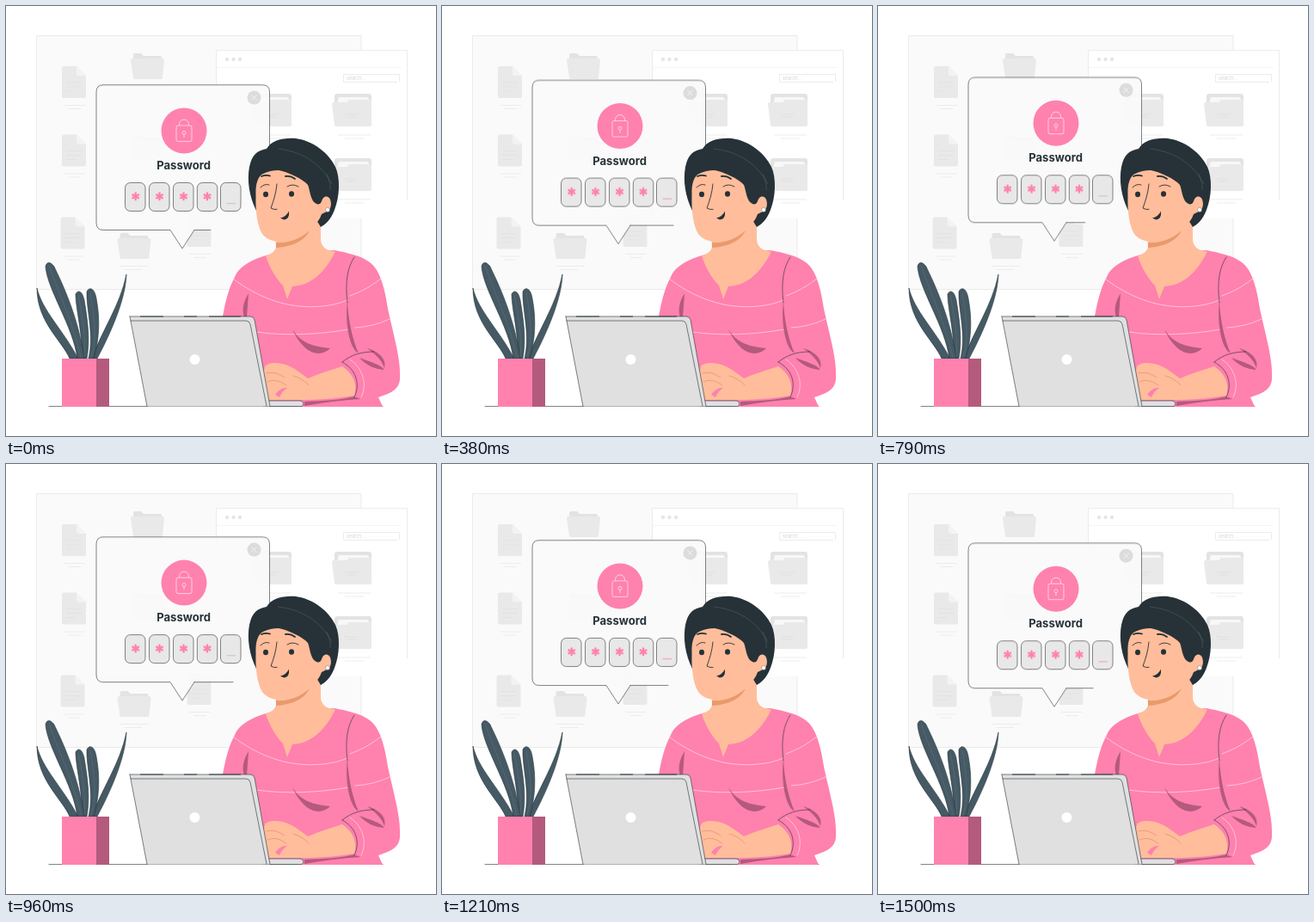
An HTML page for the animation above (1540 ms loop, 500x500 px).

```html
<!DOCTYPE html>
<html lang="en">
<head>
<meta charset="utf-8">
<title>Password entry</title>
<style>
html, body { margin: 0; width: 100%; height: 100%; overflow: hidden; background: #fff; }
svg { display: block; width: 100vw; height: 100vh; }
text { font-family: Inter, "Open Sans", sans-serif; }

.line { fill: none; stroke: #263238; stroke-width: .6; stroke-linecap: round; stroke-linejoin: round; }
.seam { fill: none; stroke: #ffd3e2; stroke-width: .8; stroke-linecap: round; }
.pink { fill: #ff81ae; }
.plum { fill: #b45a7c; }
.skin { fill: #ffbd9b; }
.dark { fill: #263238; }
.faint { fill: none; stroke: #ececec; stroke-width: 1; }

#bubble { animation: float 1540ms linear infinite; }
#edge { transform-origin: 219px 0; animation: edge 1540ms step-end infinite; }
#cursor { animation: blink 1540ms step-end infinite; }

@keyframes float {
  0% { transform: translateY(0); }
  13.6% { transform: translateY(-2.9px); }
  24.7% { transform: translateY(-5.4px); }
  40.9% { transform: translateY(-8.4px); }
  47% { transform: translateY(-9px); }
  53% { transform: translateY(-8.6px); }
  62.3% { transform: translateY(-6.9px); }
  78.6% { transform: translateY(-3.1px); }
  91% { transform: translateY(-.6px); }
  97.4%, 100% { transform: translateY(.2px); }
}
@keyframes edge {
  0% { transform: scaleX(.35); }
  8% { transform: scaleX(1); }
  20% { transform: scaleX(.91); }
  35% { transform: scaleX(.4); }
  52% { transform: scaleX(.82); }
  72% { transform: scaleX(.8); }
  90% { transform: scaleX(.57); }
  99% { transform: scaleX(.35); }
}
@keyframes blink {
  0% { stroke: #b9b9b9; }
  8% { stroke: #ff81ae; }
  34% { stroke: #b9b9b9; }
  71% { stroke: #ff81ae; }
  99.5% { stroke: #b9b9b9; }
}
</style>
</head>
<body>
<svg viewBox="0 0 500 500">
  <defs>
    <g id="doc">
      <path fill="#e9e9e9" d="M2 0H17L28 11V35Q28 37 26 37H2Q0 37 0 35V2Q0 0 2 0Z"/>
      <path fill="#f3f3f3" d="M17 0V9Q17 11 19 11H28Z"/>
      <path fill="none" stroke="#e1e1e1" stroke-width=".8" d="M5 19H23M5 24H23M5 29H17"/>
      <path class="faint" d="M3 45.5H27M8 49.5H22"/>
    </g>
    <g id="folder">
      <path fill="#e3e3e3" d="M3 29V2Q3 0 5 0H12L15 3H34Q36 3 36 5V29Z"/>
      <path fill="#e9e9e9" d="M0 8Q0 6 2 6H37Q39 6 39 8L37 28Q37 30 35 30H5Q3 30 3 28Z"/>
    </g>
    <g id="files">
      <path fill="#e3e3e3" d="M3 37V3Q3 0 6 0H43Q46 0 46 3V37Z"/>
      <path fill="#f8f8f8" d="M6 11L8 4H41L43 6V11Z"/>
      <path fill="#e9e9e9" d="M0 12Q0 10 2 10H17L20 7H44Q46 7 46 9V36Q46 38 44 38H5Q3 38 3 36Z"/>
      <path fill="none" stroke="#dedede" stroke-width=".8" d="M14 24H31M17 27H28"/>
      <path class="faint" d="M7 48H45M15 52H37"/>
    </g>
    <path id="star" fill="none" stroke="#ff81ae" stroke-width="2.3" d="M0-4.9V4.9M-4.2-2.4L4.2 2.4M-4.2 2.4L4.2-2.4"/>
    <rect id="box" width="23.5" height="33" rx="6" fill="#e8e8e8" stroke="#333" stroke-width=".6"/>
  </defs>

  <!-- back window -->
  <path fill="#fafafa" stroke="#ebebeb" d="M35.5 34.5H413V329.5H35.5Z"/>
  <use href="#doc" x="65" y="70"/>
  <use href="#doc" x="65" y="149.5"/>
  <use href="#doc" x="63.5" y="245.5"/>
  <use href="#doc" x="210.5" y="243"/>
  <use href="#folder" x="145" y="55"/>
  <use href="#folder" x="145" y="150"/>
  <use href="#folder" x="129.5" y="264"/>
  <path class="faint" d="M149 93.5H180M132 302.5H166M138 306.5H158"/>

  <!-- front window -->
  <path fill="#fff" d="M244.5 51.5H466.5V247H244.5Z"/>
  <path class="faint" d="M244.5 247V51.5H466.5V226M457.5 88V79.5H392.5V88.5H455"/>
  <path fill="none" stroke="#f5f5f5" d="M245 71.5H460"/>
  <g fill="#e6e6e6"><circle cx="257" cy="62" r="2.2"/><circle cx="264.5" cy="62" r="2.2"/><circle cx="272" cy="62" r="2.2"/></g>
  <text x="396" y="86" font-size="5.5" fill="#d4d4d4">search...</text>
  <use href="#files" x="379" y="102"/>
  <use href="#files" x="379" y="177"/>
  <use href="#files" x="286" y="102"/>
  <use href="#files" x="286" y="177"/>

  <!-- password bubble -->
  <g id="bubble">
    <path fill="#fafafa" fill-opacity=".93" d="M113 91.8H298.5Q306.500 91.8 306.500 100V252Q306.500 260.5 298.5 260.5H219L205 282L191 260.5H113Q105 260.5 105 252V100Q105 91.8 113 91.8Z"/>
    <path class="line" d="M306.5 175V100Q306.5 91.8 298.5 91.8H113Q105 91.8 105 100V252Q105 260.5 113 260.5H191L205 282L219 260.5"/>
    <path id="edge" class="line" d="M219 260.5H274"/>
    <circle cx="288.5" cy="106.5" r="8" fill="#dcdcdc"/>
    <path fill="none" stroke="#f6f6f6" stroke-width=".9" d="M285.5 103.5L291.5 109.5M291.5 103.5L285.5 109.5"/>
    <circle class="pink" cx="207" cy="145" r="26.5"/>
    <g fill="none" stroke="#ffe3ed" stroke-width=".8">
      <rect x="198" y="139" width="18" height="18.5" rx="2"/>
      <path d="M201.5 139V137.5A5.3 5.3 0 0 1 212.5 137.5V139M207 149.5V153"/>
      <circle cx="207" cy="147.5" r="2"/>
    </g>
    <text x="206.6" y="190" text-anchor="middle" font-size="13.1" font-weight="700" fill="#263238">Password</text>
    <use href="#box" x="138.5" y="205.5"/>
    <use href="#box" x="166.5" y="205.5"/>
    <use href="#box" x="194.5" y="205.5"/>
    <use href="#box" x="222.3" y="205.5"/>
    <use href="#box" x="249.5" y="205.5"/>
    <use href="#star" x="150.7" y="221.3"/>
    <use href="#star" x="178.5" y="221.3"/>
    <use href="#star" x="206.5" y="221.3"/>
    <use href="#star" x="234" y="221.3"/>
    <path id="cursor" fill="none" stroke-width=".8" d="M256.5 229.7H267"/>
  </g>

  <!-- table -->
  <path class="line" d="M50 465.5H438"/>

  <!-- plant -->
  <g fill="#455a64" stroke="#263238" stroke-width=".6">
    <path d="M100 410C110 380 133 348 140 312C139 340 124 376 106 410Z"/>
    <path d="M74 410C66 390 36 368 36 328C42 354 66 376 84 410Z"/>
    <path d="M88 410C90 386 81 352 81 335C84 329 89 332 91 342C95 366 98 388 94 410Z"/>
    <path d="M96 410C103 382 93 352 94 332C97 326 103 328 105 340C110 366 108 390 102 410Z"/>
    <path d="M83 410C78 372 48 330 46 303C47 297 52 297 56 303C64 320 84 360 91 410Z"/>
  </g>
  <path fill="none" stroke="#63757e" stroke-width=".5" d="M50 302C62 336 78 368 87 408M84 336C89 360 93 386 91 408M98 333C103 362 106 388 99 408"/>
  <path class="pink" d="M65 410H106V466H65Z"/>
  <path class="plum" d="M105 410H120V466H105Z"/>

  <!-- torso -->
  <path class="pink" d="M309 288C288 294 272 301 266 315C258 330 255 345 251 366L288 372L305 460L341 466H438L433 455C449 450 459 445 458 430C459 410 450 380 444 352C440 325 434 306 423 298C412 290 397 287 382 284Z"/>
  <path class="skin" d="M313 260L314 280Q313 287 302 290.5C306 303 313 316 322 325L327 341L333 326C357 325 373 306 383 285.5Q367 284 366 272V237H325Z"/>
  <path fill="#e99a6b" d="M314 275C328 276 342 271 353 261C347 274 331 280 314 281Z"/>
  <path class="seam" d="M264 317C282 331 304 342 327 347C352 352 379 350 397 342M400 337C414 332 426 325 437 316M406 374Q427 373 446 364M291 379C325 384 365 382 398 376"/>
  <path class="line" d="M405 292C397 304 394 321 397 345"/>
  <path class="plum" d="M397 343C398 366 403 388 410 404C399 398 394 368 397 343ZM333 376C341 389 353 396 377 398C367 408 348 408 333 376ZM282 334C276 344 274 353 277 362H280ZM347 460C370 459 390 458 406 454L412 457Q380 459 347 465Z"/>
  <path class="pink" d="M391 414C402 404 423 396 442 403C458 411 462 438 449 448C437 454 423 457 405 455C412 441 405 425 391 414Z"/>
  <path class="plum" d="M420 398C434 402 443 411 440 421C437 412 430 405 420 398ZM411 409C424 414 436 417 440 423C428 422 419 418 411 409Z"/>
  <path class="line" d="M391 414C406 422 413 438 405 455M391 414C402 405 414 402 428 402"/>
  <path class="seam" d="M400 411C414 420 421 439 413 455"/>

  <!-- head -->
  <path class="dark" d="M291 238C283 222 280 203 283 187C286 173 292 168 303 166C309 156 322 153 337 154C358 157 375 171 383 187C389 200 388 222 382 237C377 250 371 254 366 257L340 215Z"/>
  <path class="skin" d="M290.5 220C290 206 293 198 299 195Q307 191 317 191C328 193 345 201 351 208C354 216 354 227 361 230Q365 232 367 227C369 220 375 220 377 225C379 231 378 238 371 240L367 242C363 254 350 264 341 269C327 277 306 276 298 265C292 255 290 239 290.5 220Z"/>
  <path fill="none" stroke="#55666e" stroke-width=".5" d="M316 166C342 169 365 181 379 207M373 195Q378 207 377 214"/>
  <path fill="none" stroke="#263238" stroke-width="1.8" stroke-linecap="round" d="M297 198Q302 196 307 197.5M325 198Q331 197 336 201"/>
  <path class="line" style="stroke-width:.9" d="M296 211Q301 206 306 208M327 210Q333 206 340 210M315 207C314 218 311 227 308 235Q311 237 315 236.5"/>
  <ellipse class="dark" cx="302" cy="219" rx="3" ry="3.3"/>
  <ellipse class="dark" cx="332" cy="218.5" rx="3" ry="3.3"/>
  <path class="dark" d="M319 246.5Q326 245 329 238.500Q330 248 323 248.500Z"/>
  <circle cx="374" cy="237" r="2.5" fill="#fff" stroke="#263238" stroke-width=".3"/>

  <!-- hand -->
  <path class="skin" d="M391 419C379 423 365 427 351 433C340 425 332 418 321 416C312 414 304 415 301 419L299 428L305 458H340C363 458 388 456 405 453C409 440 404 428 391 419Z"/>
  <path class="pink" d="M313 452Q319 443 327 444Q321 448 318 455Z"/>
  <path fill="none" stroke="#d98a66" stroke-width=".6" stroke-linecap="round" d="M303 427Q313 424 324 432M304 437Q314 432 326 441M334 430Q345 433 352 441"/>

  <!-- laptop -->
  <g fill="#e0e0e0">
    <path class="line" style="fill:#e0e0e0" d="M303 459H342Q346 459 346 463L344 465.5H300Z"/>
    <path d="M144 361H284Q288 361 289 365L307 465.5H164Z"/>
  </g>
  <path class="line" d="M144 361L164 465.5M144 361H284Q288 361 289 365L307 465.5M145 366H279Q283 366 284 370L303 465"/>
  <path fill="none" stroke="#263238" stroke-width=".9" d="M156 361H183M207 361H222M236 361H273"/>
  <circle cx="219.500" cy="411" r="6" fill="#fff"/>
</svg>
</body>
</html>
```
